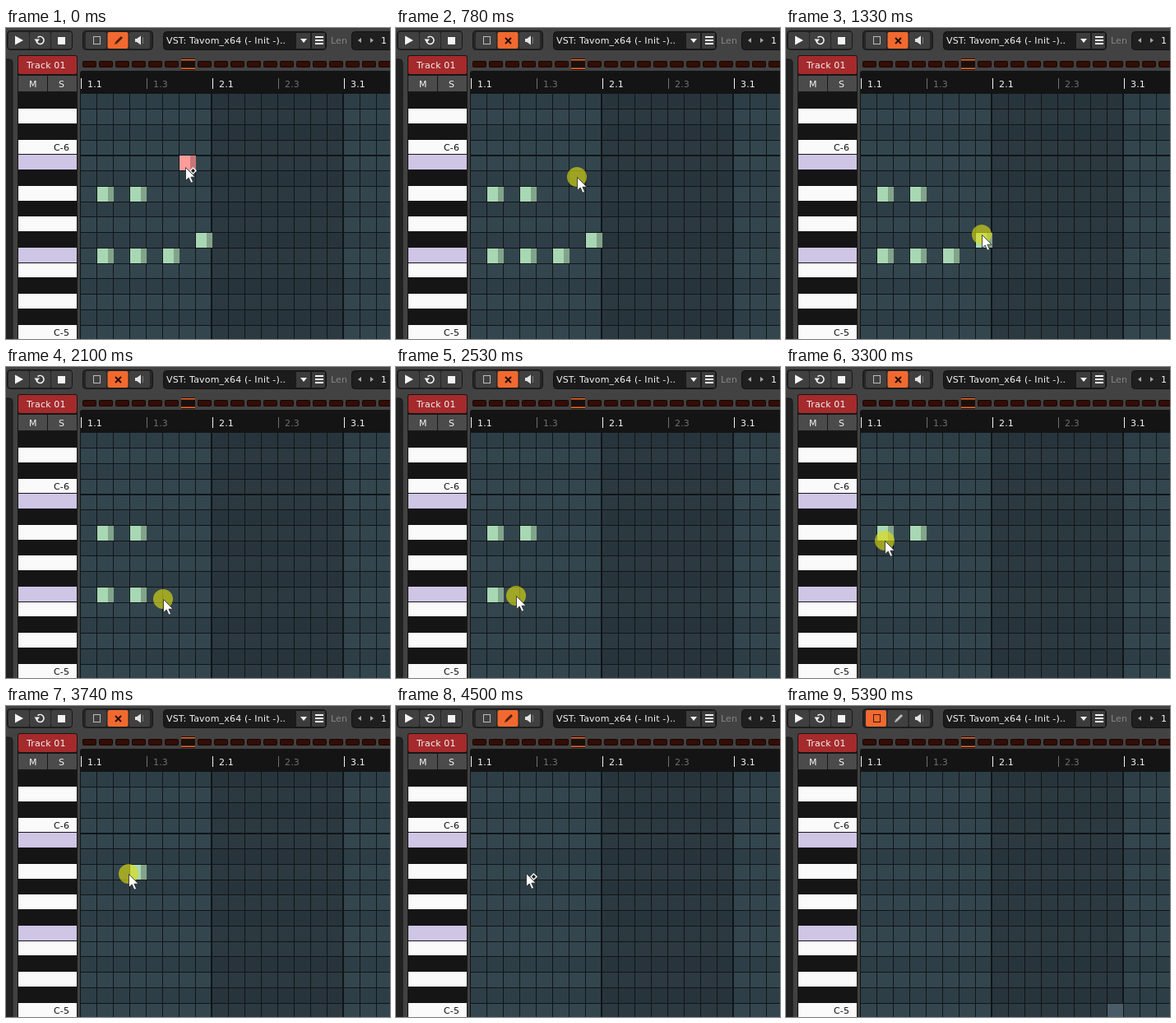
These frames come from a looping animation (467x378 px, 5720 ms). An HTML page with a canvas:

```html
<!DOCTYPE html>
<html>
<head>
<meta charset="utf-8">
<title>Piano roll</title>
<style>
html, body { margin: 0; height: 100%; overflow: hidden; background: #424242; }
canvas { display: block; }
</style>
</head>
<body>
<canvas id="stage" width="467" height="378"></canvas>
<script>
const ctx = document.getElementById('stage').getContext('2d');
const LOOP = 5720, STEP = 110, WHITE = '#f4f4f4', ORANGE = '#f2692f', GRID = '#101518';

// Row 0 is D#6, descending in semitones.
const KEYS = 'bwbwlbwbwblwbwbw';
const rowY = row => Math.floor(79.8 + 18.75 * row);
const colX = col => 90 + 20 * col;

// column, row, step at which the note is erased
const NOTES = [[6, 4, 5], [7, 9, 13], [5, 10, 18], [3, 10, 23], [1, 10, 25], [1, 6, 31], [3, 6, 35]];

// Pointer keys: step, x, y
const PATH = [
  [6, 218, 169], [9, 224, 206], [12, 238, 251], [14, 230, 267], [17, 206, 285], [18, 198, 283],
  [19, 191, 282], [24, 135, 277], [27, 118, 275], [28, 114, 262], [30, 120, 211],
  [32, 133, 207], [34, 149, 204], [36, 158, 203], [43, 158, 203], [45, 215, 246], [48, 401, 367]
];

function rect(x, y, w, h, color) {
  ctx.fillStyle = color;
  ctx.fillRect(x, y, w, h);
}

function round(x, y, w, h, r, fill, stroke) {
  ctx.beginPath();
  ctx.roundRect(x, y, w, h, r);
  ctx.fillStyle = fill;
  ctx.fill();
  if (stroke) {
    ctx.lineWidth = 1;
    ctx.strokeStyle = stroke;
    ctx.stroke();
  }
}

function poly(points, fill, stroke) {
  ctx.beginPath();
  points.forEach(([x, y]) => ctx.lineTo(x, y));
  ctx.closePath();
  ctx.fillStyle = fill;
  ctx.fill();
  if (stroke) {
    ctx.lineWidth = .8;
    ctx.strokeStyle = stroke;
    ctx.stroke();
  }
}

function diamond(x, y, r, fill) {
  poly([[x, y - r], [x + r, y], [x, y + r], [x - r, y]], fill);
}

function line(x1, y1, x2, y2, color, width = 1) {
  ctx.beginPath();
  ctx.moveTo(x1, y1);
  ctx.lineTo(x2, y2);
  ctx.strokeStyle = color;
  ctx.lineWidth = width;
  ctx.stroke();
}

function text(str, x, y, color = WHITE) {
  ctx.font = '11px "DejaVu Sans", sans-serif';
  ctx.letterSpacing = '0.18px';
  ctx.fillStyle = color;
  ctx.fillText(str, x, y);
}

function pointerAt(step) {
  const next = PATH.findIndex(key => key[0] > step);
  if (next === 0) return PATH[0].slice(1);
  if (next < 0) return PATH[PATH.length - 1].slice(1);
  const [s0, x0, y0] = PATH[next - 1], [s1, x1, y1] = PATH[next];
  const k = (step - s0) / (s1 - s0);
  return [x0 + (x1 - x0) * k, y0 + (y1 - y0) * k].map(Math.round);
}

function drawTransport() {
  round(1.5, 3.5, 79, 23, 4, '#262626', '#161616');
  for (const x of [3, 29, 55]) round(x, 5, 25, 20, 2, '#404040');
  poly([[11, 9.5], [21, 15], [11, 20.5]], WHITE);
  ctx.beginPath();
  ctx.arc(41.5, 15, 4.5, -2.3, 2.8);
  ctx.strokeStyle = WHITE;
  ctx.lineWidth = 1.6;
  ctx.stroke();
  poly([[34.5, 13.5], [41, 13.5], [37.5, 18]], WHITE);
  rect(63, 11, 9, 9, WHITE);
}

function drawTools(mode) {
  const active = mode === 'select' ? 0 : 1;
  round(93.5, 3.5, 85, 23, 4, '#262626', '#161616');
  for (let i = 0; i < 3; i++) round(97 + i * 26.5, 5, 25, 20, 2, i === active ? ORANGE : '#404040');

  ctx.strokeStyle = active === 0 ? '#331a10' : '#bbb';
  ctx.lineWidth = 1;
  ctx.strokeRect(106.5, 10.5, 8, 9);

  if (mode === 'erase') {
    line(133, 12, 140, 19, '#24100a', 2);
    line(140, 12, 133, 19, '#24100a', 2);
  } else {
    const color = active ? '#4a2010' : '#bbb';
    line(134, 18, 141, 11, color, 2.8);
    poly([[132, 20], [133, 17], [135, 19]], color);
  }

  poly([[157, 13], [159, 13], [164, 9.5], [164, 20.5], [159, 17], [157, 17]], '#e4e4e4');
  line(166.5, 11, 166.5, 19, '#777');
}

function drawInstrumentBar() {
  round(191.5, 4.5, 198, 22, 4, '#1b1b1b', '#111');
  rect(353, 6, 17, 19, '#3c3c3c');
  rect(372, 6, 16, 19, '#3c3c3c');
  text('VST: Tavom_x64 (- Init -)..', 195, 19);
  poly([[358, 13], [366, 13], [362, 18]], WHITE);
  for (const y of [10, 14, 18]) rect(376, y, 10, 2, WHITE);
  text('Len', 395, 19, '#858585');
  round(420.5, 4.5, 60, 22, 4, '#1f1f1f', '#111');
  poly([[432, 12], [432, 18], [428, 15]], '#aaa');
  poly([[443, 12], [443, 18], [447, 15]], '#aaa');
  text('1', 456, 19);
}

function drawTrackHead() {
  round(-10, 38, 18, 360, 4, '#222', '#171717');
  round(14, 33, 73, 360, 3, '#171717');
  round(15, 34, 71, 22, 2, '#a52a2c');
  text('Track 01', 25, 49);
  rect(15, 58, 35, 19, '#4b4b4b');
  rect(51, 58, 35, 19, '#4b4b4b');
  text('M', 28, 72);
  text('S', 64, 72);
}

function drawRuler() {
  for (let col = 0; col < 19; col++) {
    const x = colX(col) + 3, on = col === 6;
    round(x + .5, 40.5, 16, 7, 1, on ? '#35160c' : '#340d06', '#120604');
    if (on) {
      rect(x, 37, 17, 14, '#1a0f0b');
      rect(x, 38, 17, 1.5, ORANGE);
      rect(x, 48.5, 17, 1.5, ORANGE);
    }
  }
  round(90, 52, 390, 340, 3, '#141414');
  ['1.1', '1.3', '2.1', '2.3', '3.1'].forEach((label, i) => {
    const color = i % 2 ? '#707070' : WHITE;
    rect(91 + 80 * i, 61, 1, 13, color);
    text(label, 99 + 80 * i, 72, color);
  });
}

function drawRoll() {
  [...KEYS].forEach((key, row) => {
    const y = rowY(row), h = rowY(row + 1) - y, dark = key === 'b';
    rect(15, y, 71, dark ? h : h - 1, { b: '#151515', w: '#fafafa', l: '#cfc5e5' }[key]);
    for (let col = 0; col < 19; col++) {
      const dimBar = col >= 8 && col < 16;
      const color = dimBar ? (dark ? '#28343b' : '#2c3940') : (dark ? '#2e3e46' : '#33464e');
      rect(colX(col), y, 20, h, color);
    }
  });
  text('C-6', 58, 149, '#111');
  text('C-5', 58, 374, '#111');

  for (let row = 0; row < 16; row++) rect(90, rowY(row), 377, row === 4 ? 2 : 1, GRID);
  for (let col = 0; col < 19; col++) {
    const bar = col === 8 || col === 16;
    rect(colX(col) - (bar ? 1 : 0), 80, bar ? 2 : 1, 298, GRID);
  }
}

function drawNotes(step) {
  for (const [col, row, erased] of NOTES) {
    if (step >= erased) continue;
    const x = colX(col) + 1, y = rowY(row) + 1, red = row === 4;
    rect(x, y, 20, 18, red ? '#c67676' : '#82a48a');
    rect(x, y, 13, 18, red ? '#ff9c9a' : '#a8d7b3');
  }
}

function drawPointer(x, y, pencil) {
  ctx.save();
  ctx.translate(x, y);
  if (pencil) {
    diamond(9.5, 4.5, 4.5, WHITE);
    diamond(9.5, 4.5, 2.5, '#222');
  }
  poly([[.5, .5], [.5, 16.5], [4.2, 13], [7, 19.3], [9.6, 18.2], [6.9, 12.2], [12, 12.2]], '#fff', '#222');
  ctx.restore();
}

function draw(time) {
  const step = Math.floor((time % LOOP + 10) / STEP);
  const mode = step >= 42 ? 'select' : step >= 4 && step < 41 ? 'erase' : 'pencil';
  const [x, y] = pointerAt(step);

  rect(0, 0, 467, 378, '#424242');
  drawTransport();
  drawTools(mode);
  drawInstrumentBar();
  drawTrackHead();
  drawRuler();
  drawRoll();

  if (step >= 44) {
    const col = Math.floor((x - 90) / 20), row = Math.floor((y - 79.8) / 18.75);
    rect(colX(col) + 1, rowY(row) + 1, 19, 18, '#4a5c67');
  }
  drawNotes(step);

  if (mode === 'erase') {
    ctx.beginPath();
    ctx.arc(x, y, 12, 0, 7);
    ctx.fillStyle = 'rgba(222, 220, 15, .64)';
    ctx.fill();
  }
  if (step < 49) drawPointer(x, y, step === 0 || step === 41);
}

function tick(now) {
  draw(now);
  requestAnimationFrame(tick);
}
draw(0);
requestAnimationFrame(tick);
</script>
</body>
</html>
```
